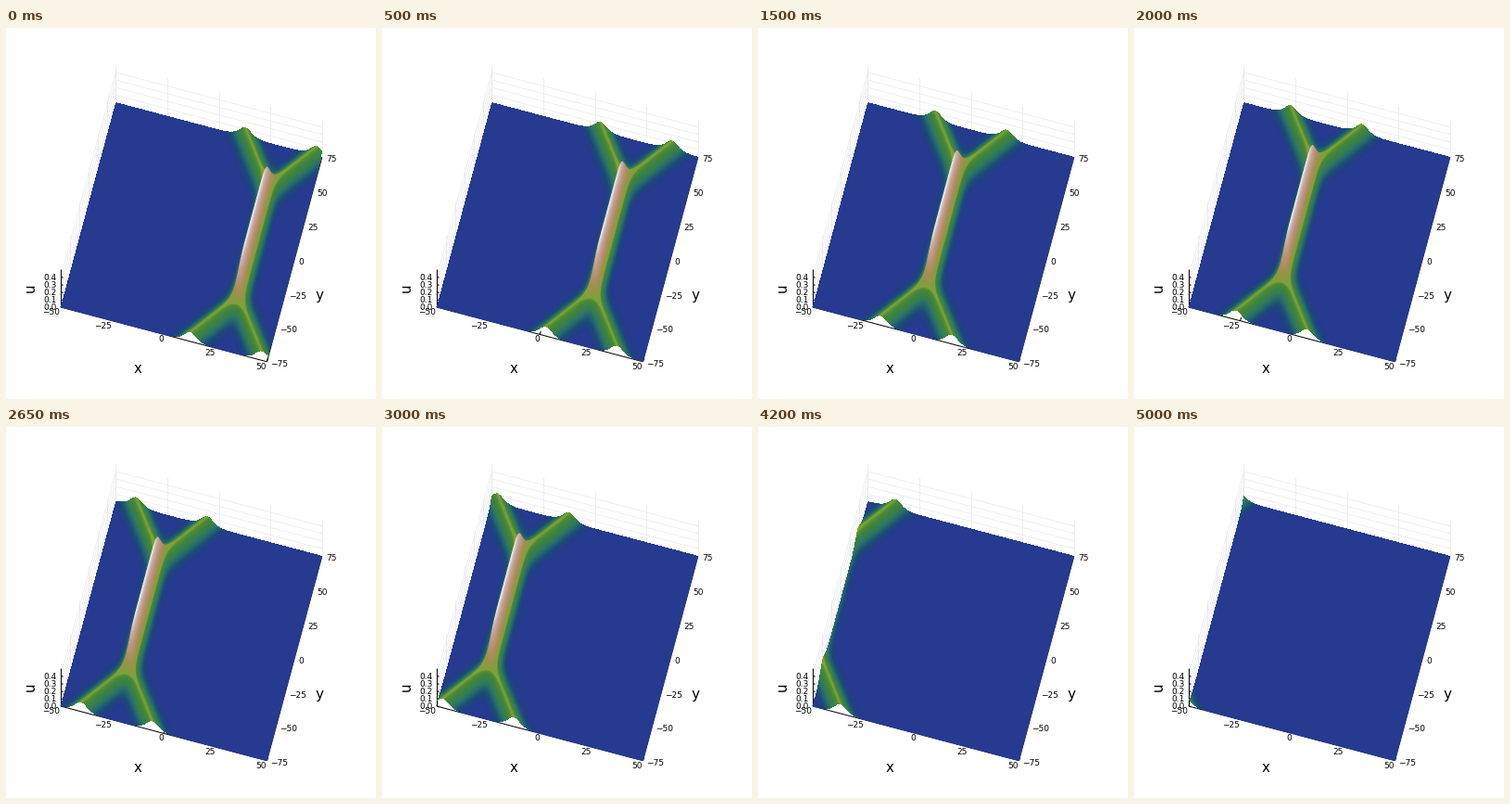
Animation of 399 by 400 pixels, one loop 5.05 s. Source, as a matplotlib script:

```python
import numpy as np
import matplotlib.pyplot as plt
from matplotlib.animation import FuncAnimation
from matplotlib.colors import LinearSegmentedColormap

W, H, DPI = 399, 400, 100
FRAMES, STEP = 101, 50
SS = 2                      # supersampling of the surface
X0, Y0 = -50, -75           # front left corner of the domain
ORIGIN = np.array([59.0, 301.0])
EX = np.array([2.224, 0.588])
EY = np.array([0.396, -1.470])
ZPX, ZMAX = 81.5, 0.5
START, SHIFT = 30.1, 20.2   # first stem position, phase shift

STOPS = [
    (0.000, (38, 58, 143)), (0.008, (33, 64, 133)), (0.020, (27, 75, 118)),
    (0.040, (33, 94, 114)), (0.070, (43, 112, 104)), (0.110, (53, 124, 84)),
    (0.160, (60, 130, 65)), (0.215, (72, 137, 54)), (0.238, (88, 146, 52)),
    (0.250, (126, 163, 56)), (0.290, (136, 156, 62)), (0.380, (152, 147, 74)),
    (0.500, (170, 142, 90)), (0.650, (186, 146, 117)),
    (0.800, (195, 159, 146)), (0.930, (206, 185, 182)),
    (1.000, (236, 234, 238)),
]


def project(x, y, z=0.0):
    p = ORIGIN + (x - X0) * EX + (y - Y0) * EY
    return p[0], p[1] - ZPX * z


def height(xi, spread):
    """Two-soliton wave: 2 (log tau)_xx, tau = 2 cosh(xi/2) + spread."""
    c = np.cosh(xi / 2)
    return (2 + spread * c) / (2 * c + spread) ** 2


# Surface samples on screen columns, ordered from back to front
rows = np.linspace(75, -75, 1350)[:, None]
cols = np.arange(W * SS)[None, :]
gx = ((cols + 0.5) / SS - ORIGIN[0] - EY[0] * (rows - Y0)) / EX[0] + X0
inside = np.abs(gx) <= 50
xs = gx[inside]
ys = np.broadcast_to(rows, gx.shape)[inside]
col = np.broadcast_to(cols, gx.shape)[inside]
ground = ORIGIN[1] + EX[1] * (xs - X0) + EY[1] * (ys - Y0)
spread = 2 * np.exp(-SHIFT / 2) * np.cosh(ys / 4)

cmap = LinearSegmentedColormap.from_list(
    "relief", [(p, tuple(v / 255 for v in rgb)) for p, rgb in STOPS], N=255)
palette = np.vstack([np.zeros(4), cmap(np.arange(255))]).astype(np.float32)


def render(frame):
    u = height(xs - START + frame, spread)
    py = ((ground - ZPX * u) * SS).astype(np.int32)
    level = np.minimum(u / ZMAX * 255, 254).astype(np.uint8) + 1
    buf = np.zeros(W * H * SS * SS, np.uint8)
    buf[py * (W * SS) + col] = level
    buf = buf.reshape(H * SS, W * SS)
    rgba = sum(palette[buf[i::SS, j::SS]]
               for i in range(SS) for j in range(SS)) / SS ** 2
    rgba[..., :3] /= np.maximum(rgba[..., 3:], 1e-6)
    rgba[..., 3] = rgba[..., 3] >= 0.5      # crisp outline
    return np.clip(rgba, 0, 1)


fig = plt.figure(figsize=(W / DPI, H / DPI), dpi=DPI, facecolor="white")
ax = fig.add_axes([0, 0, 1, 1])
ax.axis("off")


def px(size):
    return size * 72 / DPI


def line(a, b, color="black", width=1.0):
    ax.plot(*zip(project(*a), project(*b)), color=color, lw=px(width),
            solid_capstyle="butt", zorder=1)


def grid(a, b):
    line(a, b, "#e8e8e8", 0.7)


def label(x, y, text, ha="center", size=9.0, **kw):
    ax.text(x, y, text, ha=ha, va=kw.pop("va", "center_baseline"),
            fontsize=px(size), family="DejaVu Sans", zorder=5, **kw)


def number(v):
    return str(v).replace("-", "\u2212")


xticks = range(-50, 51, 25)
yticks = range(-75, 76, 25)
zticks = [0.0, 0.1, 0.2, 0.3, 0.4]

for x in xticks:
    grid((x, 75, 0), (x, 75, ZMAX))
for y in yticks:
    grid((-50, y, 0), (-50, y, ZMAX))
for z in zticks:
    grid((-50, 75, z), (50, 75, z))
    grid((-50, -75, z), (-50, 75, z))

line((-50, -75, 0), (50, -75, 0))
line((50, -75, 0), (50, 75, 0))
line((-50, -75, 0), (-50, -75, ZMAX))

for x in xticks:
    line((x, -75, 0), (x, -72.5, 0))
    a, b = project(x, -75)
    label(a - 0.5, b + 4.5, number(x), "right")
for y in yticks:
    a, b = project(50, y)
    label(a + 4, b + 1.7, number(y), "left")
for z in zticks:
    line((-50, -75, z), (-48.8, -75, z))
    a, b = project(-50, -75, z)
    label(a - 4.5, b - 0.3, f"{z:.1f}", "right")

label(142, 367, "x", size=15, va="center")
label(338, 288, "y", size=15, va="center")
label(26, 280, "u", size=15, va="center", rotation=90)

surface = ax.imshow(render(0), extent=(0, W, H, 0), interpolation="nearest",
                    aspect="auto", zorder=3)
ax.set_xlim(0, W)
ax.set_ylim(H, 0)


def update(frame):
    surface.set_data(render(frame))
    return (surface,)


anim = FuncAnimation(fig, update, frames=FRAMES, interval=STEP,
                     repeat=True, repeat_delay=0, blit=False)
plt.show()
```
